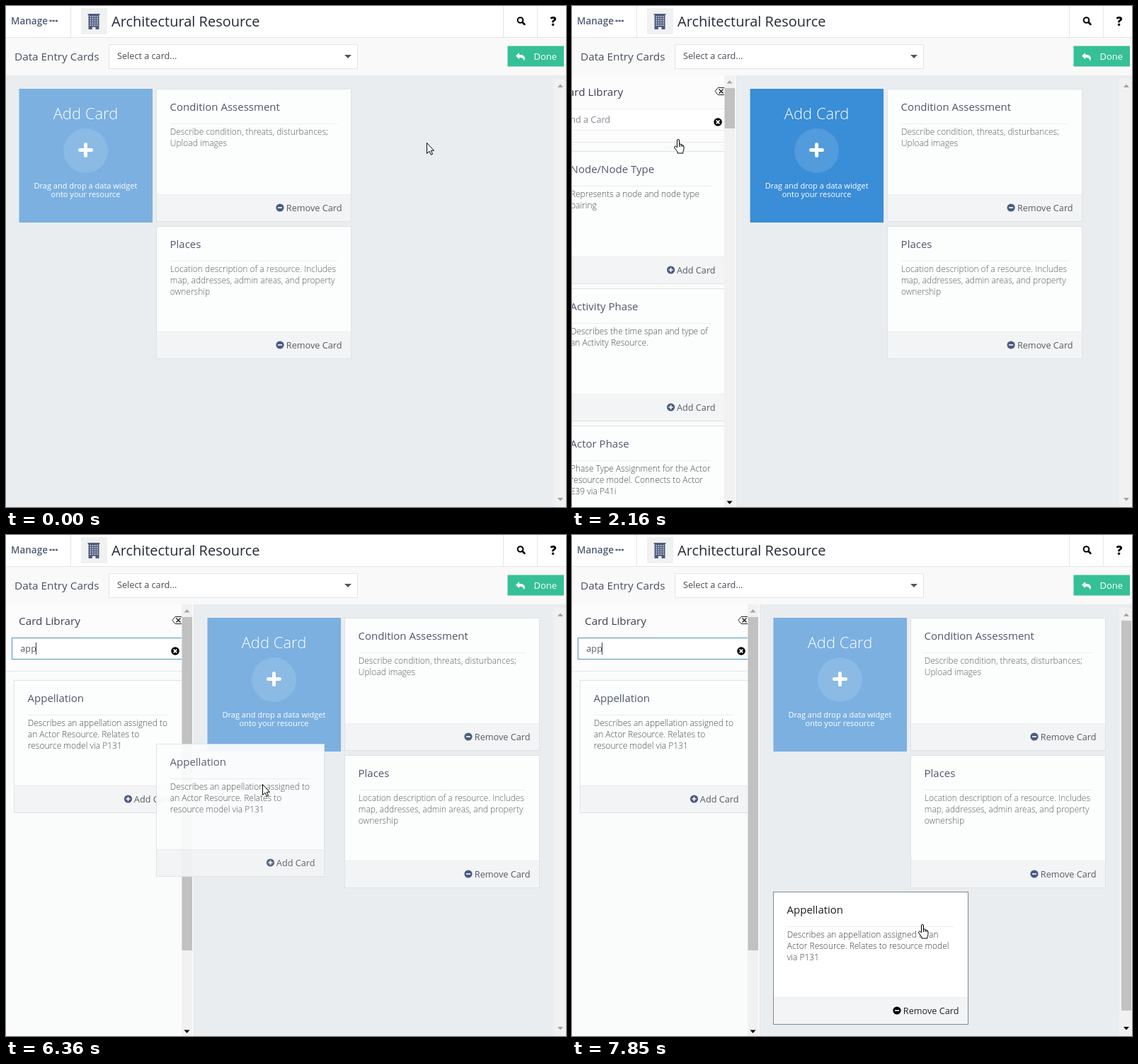
Recreate the animation shown at these times as an HTML page. Size 791 px wide and 708 px high, loop 8000 ms.

```html
<!DOCTYPE html>
<html lang="en">
<head>
<meta charset="utf-8">
<title>Card library</title>
<style>
  html, body { margin: 0; width: 100%; height: 100%; overflow: hidden; background: #e9edf0; }
  svg { display: block; width: 791px; height: 708px; font: 12.7px "Open Sans", sans-serif; }
  .title { font-size: 15px; fill: #50576c; }
  .desc { font-size: 12px; font-weight: 300; fill: #4c4c4c; }
  #placed .desc { fill: #5e5e5e; }
  #placed .hover .desc { fill: #3c3c3c; }
  .action { fill: #585b64; }
  .icon { fill: #4c5b80; }
  .face { fill: #fcfdfd; stroke: #dfe2e4; }
  .foot { fill: #f3f4f6; }
  .rule { stroke: #ebedee; fill: none; }
  .hover .title { fill: #1c1c1c; }
  .hover .icon { fill: #000; }
  .hover .action { fill: #222; }
  .hover .face { fill: #fff; stroke: #85888b; }
  .arrow { fill: #a0a3a5; }
  .white { fill: #fff; }
  .cursor { fill: #fff; stroke: #000; stroke-linejoin: round; }
</style>
</head>
<body>
<svg viewBox="0 0 791 708">
  <rect width="791" height="708" fill="#e9edf0"/>

  <g id="main">
    <g id="tile">
      <rect id="tileFill" x="18.500" y="117" width="188.500" height="189"/>
      <circle cx="112.500" cy="204.500" r="31.500" fill="#fff" fill-opacity=".12"/>
      <path d="M104.500 203.500h16M112.500 195.500v16" stroke="#fff" stroke-width="5" stroke-linecap="round"/>
      <g class="white" text-anchor="middle">
        <text x="112.500" y="160" font-size="22" font-weight="300">Add Card</text>
        <g font-size="11">
          <text x="112.500" y="258">Drag and drop a data widget</text>
          <text x="112.500" y="270">onto your resource</text>
        </g>
      </g>
    </g>
    <g id="placed"></g>
  </g>

  <g id="pageScroll">
    <rect x="773" y="103" width="18" height="605" fill="#f1f1f1"/>
    <rect id="pageThumb" x="776" y="121" width="14" height="551" fill="#c1c1c1"/>
    <path class="arrow" d="M779 115l4-4.500 4 4.500z"/>
    <path id="pageDown" class="arrow" d="M779 695l4 4.500 4-4.500z"/>
  </g>

  <g id="library">
    <rect y="98" width="265" height="610" fill="#fafbfb"/>
    <rect y="98" width="265" height="94" fill="#fcfcfc"/>
    <path d="M0 192.500H248" stroke="#e6e8e9"/>
    <path d="M265.500 98V708" stroke="#dfe4e7"/>
    <text x="18" y="127" font-size="15.300" fill="#3e4350">Card Library</text>
    <path d="M235 120.500l4-5h10v10h-10z" fill="#fff" stroke="#222"/>
    <path d="M240.500 117.500l6 6m0-6l-6 6" stroke="#222" stroke-width="1.500"/>
    <rect x="8.500" y="145.500" width="245" height="30" fill="#fff" stroke="#ebeced"/>
    <rect id="focus" x="8.500" y="145.500" width="245" height="30" fill="none" stroke="#4c93ca"/>
    <text id="query" x="20.300" y="165"></text>
    <path id="caret" d="M0 152v17" stroke="#333a4c"/>
    <circle cx="239" cy="164" r="5.800"/>
    <path d="M236.700 161.700l4.600 4.600m0-4.600l-4.600 4.600" stroke="#fff" stroke-width="1.800"/>
    <g id="list"></g>
    <rect x="248" y="98" width="15.500" height="610" fill="#f1f1f1"/>
    <rect id="thumb" x="248.500" y="116" width="14.500" fill="#c1c1c1"/>
    <path class="arrow" d="M251.500 109.500l4-4.500 4 4.500z"/>
    <path d="M251.500 699.500l4 4.500 4-4.500z"/>
  </g>

  <g id="header">
    <rect width="791" height="45" fill="#fff"/>
    <rect y="45" width="791" height="53" fill="#f9f9f9"/>
    <path d="M0 44.500H791M91.500 0V44M702.500 0V44M750.500 0V44" stroke="#e4e5e6"/>
    <text x="7" y="26" font-size="13.500" font-weight="600" fill="#515d74">Manage</text>
    <path d="M61.500 21h11.400" stroke="#515d74" stroke-width="2.600" stroke-dasharray="3 1.200"/>
    <rect x="106" y="3" width="37" height="37" fill="#f0f1f1"/>
    <path d="M115.500 11h17v1.500h-1V33h-15V12.500h-1z" fill="#4c5b80"/>
    <path d="M118.600 15h11M118.600 18h11M118.600 21h11M118.600 24h11M118.600 27h11" stroke="#f0f1f1" stroke-width="1.500" stroke-dasharray="1.570 1.570"/>
    <path d="M121.800 29.800h4.700V33h-4.700z" fill="#f0f1f1"/>
    <text x="149" y="29" font-size="20" fill="#252a37">Architectural Resource</text>
    <circle cx="726.500" cy="20" r="3.800" fill="none" stroke="#000" stroke-width="2"/>
    <path d="M729.500 23l3 3" stroke="#000" stroke-width="2.500" stroke-linecap="round"/>
    <text x="773" y="27.500" font-size="17" font-weight="800" text-anchor="middle">?</text>
    <text x="12" y="77" font-size="15.300" fill="#4a5062">Data Entry Cards</text>
    <rect x="145.500" y="54.500" width="351" height="34" fill="#fff" stroke="#e3e4e5"/>
    <text x="157" y="75" fill="#4a4d55">Select a card...</text>
    <path d="M478 69h10l-5 5z" fill="#50545c"/>
    <rect x="708.500" y="56.500" width="79.500" height="29" fill="#36c096"/>
    <path d="M720 70.500l5-4.500v2.700q7.500 0 8 5 0 2-1.500 3.800 0-4.800-6.500-4.800v2.500z" fill="#fff"/>
    <text class="white" x="745.500" y="76" font-size="13">Done</text>
  </g>

  <g id="ghost" opacity=".93"></g>
  <g id="cursor" class="cursor">
    <path id="pointer" d="M.5 .5V15.500L4 12.200 6.300 17.300 8.500 16.300 6.300 11.300H10.500Z"/>
    <path id="hand" transform="translate(1 -1)" d="M-1.500 12V2Q-1.500 .5 0 .5T1.500 2V7Q3.800 6.300 4 8 6 7.300 6.200 9 8 8.600 8 10.500V14Q8 16 6.800 17.800V20H-1V18L-5.200 12.500Q-6 10.500 -4.300 10 -3 10 -1.500 12ZM1.500 7v4M4 8v3M6.200 9v2"/>
    <path id="beam" fill="none" d="M-2.500 -5.500H2.500M-2.500 7.500H2.500M0 -5.500V7.500"/>
  </g>
</svg>
<script>
const $ = id => document.getElementById(id);
const LOOP = 8000, PANEL = 266;

function card(x, y, w, title, lines, action = "Add") {
  const iconX = w - (action === "Add" ? 76.5 : 101);
  const bar = `M${iconX - 3} 167h6` + (action === "Add" ? `M${iconX} 164v6` : "");
  return `<g transform="translate(${x} ${y})">
    <rect class="face" x="-.5" y="-.5" width="${w}" height="187"/>
    <path class="foot" d="M0 148H${w - 1}V186H0z"/>
    <path class="rule" d="M19.500 48.500H${w - 20}M0 148.500H${w - 1}"/>
    <text class="title" x="18.500" y="30">${title}</text>
    ${lines.map((line, i) => `<text class="desc" x="18.800" y="${64 + 16 * i}">${line}</text>`).join("")}
    <circle class="icon" cx="${iconX}" cy="167" r="5.600"/>
    <path d="${bar}" stroke="#fff" stroke-width="1.600"/>
    <text class="action" x="${w - 13.5}" y="172" text-anchor="end">${action} Card</text>
  </g>`;
}

const node = ["Node/Node Type", ["Represents a node and node type", "pairing"]];
const activity = ["Activity Phase", ["Describes the time span and type of", "an Activity Resource."]];
const actor = ["Actor Phase", ["Phase Type Assignment for the Actor", "resource model. Connects to Actor", "E39 via P41i"]];
const appellation = ["Appellation", ["Describes an appellation assigned to", "an Actor Resource. Relates to", "resource model via P131"]];

const searches = [
  { at: 0, text: "", caret: 20.5, thumb: 57, cards: [node, activity, actor] },
  { at: 4010, text: "a", caret: 27.5, thumb: 110, cards: [activity, actor, appellation] },
  { at: 4320, text: "ap", caret: 35, thumb: 471, cards: [appellation] },
  { at: 4480, text: "app", caret: 42.5, thumb: 471, cards: [appellation] }
];

$("placed").innerHTML =
  card(213, 118, 275, "Condition Assessment",
    ["Describe condition, threats, disturbances;", "Upload images"], "Remove") +
  card(213, 312, 275, "Places",
    ["Location description of a resource. Includes", "map, addresses, admin areas, and property", "ownership"], "Remove") +
  `<g id="dropped" class="hover">${card(19, 505, 275, "Appellation",
    ["Describes an appellation assigned to an", "Actor Resource. Relates to resource model", "via P131"], "Remove")}</g>`;
$("list").innerHTML = searches.map(s =>
  `<g>${s.cards.map((c, i) => card(12, 206 + 194 * i, 237, ...c)).join("")}</g>`).join("");
$("ghost").innerHTML = card(0, 0, 237, ...appellation);

// Motion is refreshed in bursts: [start, end, number of steps]
const bursts = [[0, 1, 1], [960, 1560, 9], [1930, 2210, 5], [2450, 2590, 3],
  [5320, 5540, 4], [6230, 6360, 3], [6360, 6870, 8]];

function lastStep(t) {
  const [start, end, n] = bursts.findLast(b => b[0] <= t);
  if (n < 2) return start;
  const gap = (end - start) / (n - 1);
  return start + gap * Math.min(n - 1, Math.floor((t - start) / gap + 0.01));
}

const linear = p => p;
const swing = p => 0.5 - Math.cos(Math.PI * p) / 2;
const easeOut = p => 1 - (1 - p) ** 2;
const progress = (t, a, b) => Math.max(0, Math.min(1, (t - a) / (b - a)));

// [time, x, y, easing towards this point]
const path = [
  [0, 594, 193], [890, 594, 193, linear], [1560, 148.5, 188.5, swing],
  [2400, 148.5, 188.5, linear], [2590, 133.5, 161, swing],
  [5270, 133.5, 161, linear], [5540, 125, 242, swing],
  [6190, 125, 242, linear], [6335, 326, 332.7, linear], [6360, 362, 352, linear],
  [6640, 500, 536, easeOut], [6840, 494, 551, swing], [LOOP, 494, 551, linear]
];

function cursorAt(t) {
  const i = path.findIndex((p, k) => k > 0 && t <= p[0]);
  const [t0, x0, y0] = path[i - 1], [t1, x1, y1, ease] = path[i];
  const p = ease(progress(t, t0, t1));
  return [x0 + (x1 - x0) * p, y0 + (y1 - y0) * p];
}

const move = (id, x, y) => $(id).setAttribute("transform", `translate(${x} ${y})`);
const show = (id, on) => $(id).style.display = on ? "" : "none";
const within = (t, a, b) => t >= a && t < b;

function render(t) {
  const held = lastStep(t);
  const [x, y] = cursorAt(held);
  const slide = PANEL * swing(progress(held, 1904, 2210));
  const tileHover = t < 2450 && x < 207;
  const dropped = t >= 7090;

  move("main", slide, 0);
  move("library", slide - PANEL, 0);
  show("library", slide > 0);
  $("tileFill").setAttribute("fill", tileHover ? "#3a8dd7" : "#7bb0e1");

  const current = searches.findLastIndex(s => s.at <= t);
  const { text, caret, thumb } = searches[current];
  [...$("list").children].forEach((g, i) => g.style.display = i === current ? "" : "none");
  $("query").textContent = text || "Find a Card";
  $("query").setAttribute("fill", text ? "#555b68" : "#858a92");
  $("thumb").setAttribute("height", thumb);
  move("caret", caret, 0);
  show("caret", within(t, 3130, 3620) || within(t, 4010, 5000) || within(t, 5470, 5930) || t >= 6300);
  $("focus").setAttribute("opacity", progress(t, 3210, 3560));

  // The dragged card trails the cursor slightly
  const [grabX, grabY] = cursorAt(Math.max(0, held - 25));
  move("ghost", Math.round(grabX - 113), Math.round(grabY - 37));
  show("ghost", within(t, 6230, 7090));
  show("dropped", dropped);
  show("pageThumb", dropped);
  $("pageDown").style.fill = dropped ? "#000" : "";

  const beam = within(t, 2520, 5390);
  const hand = tileHover || within(t, 5460, 6230) || dropped;
  move("cursor", Math.round(x), Math.round(y));
  show("beam", beam);
  show("hand", hand && !beam);
  show("pointer", !hand && !beam);
}

let start;
function tick(now) {
  start ??= now;
  render((now - start) % LOOP);
  requestAnimationFrame(tick);
}
render(0);
requestAnimationFrame(tick);
</script>
</body>
</html>
```
